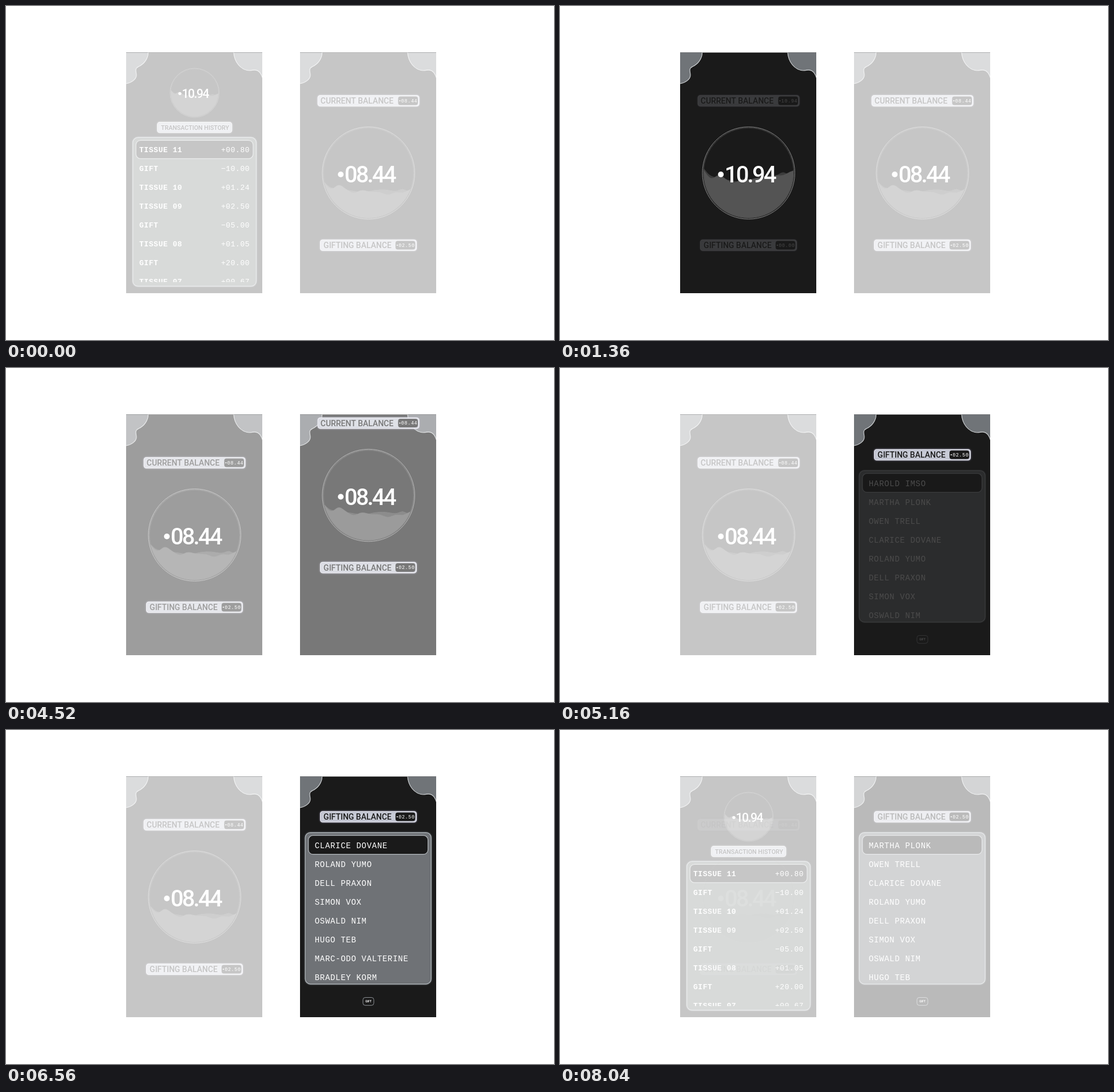
Recreate the animation shown at these times as an HTML page with a canvas. Size 958x585 px, loop 8.12 s.

```html
<!DOCTYPE html>
<html lang="en">
<head>
<meta charset="utf-8">
<title>Balance screens</title>
<style>
html, body { margin: 0; width: 100%; height: 100%; overflow: hidden; background: #fff; }
canvas { display: block; }
</style>
</head>
<body>
<canvas id="stage" width="958" height="585"></canvas>
<script>
const W = 958, H = 585, LOOP = 8120;
const DARK = '#1a1a1a', PILL = '#c8cbd6', DIM = 0.75;
const SANS = 'Roboto, Arial, sans-serif';
const MONO = '"Liberation Mono", "Courier New", monospace';

const stage = document.getElementById('stage').getContext('2d');
const spare = document.createElement('canvas');
spare.width = W;
spare.height = H;
const spareCtx = spare.getContext('2d');
let c = stage;

const history = [
  ['TISSUE 11', '+00.80'], ['GIFT', '−10.00'], ['TISSUE 10', '+01.24'], ['TISSUE 09', '+02.50'],
  ['GIFT', '−05.00'], ['TISSUE 08', '+01.05'], ['GIFT', '+20.00'], ['TISSUE 07', '+00.67']
];
const people = [
  'HAROLD IMSO', 'MARTHA PLONK', 'OWEN TRELL', 'CLARICE DOVANE', 'ROLAND YUMO', 'DELL PRAXON',
  'SIMON VOX', 'OSWALD NIM', 'HUGO TEB', 'MARC-ODO VALTERINE', 'BRADLEY KORM'
];
// water surface relative to the dial centre, for a radius of 81
const front = [[-82, 10], [-74, 22], [-64, 30], [-52, 19], [-40, 28], [-26, 37], [-12, 29], [4, 34],
  [20, 33], [34, 40], [48, 33], [60, 36], [72, 29], [82, 26]];
const back = [[-82, 10], [-72, 24], [-58, 28], [-30, 31], [-8, 35], [10, 30], [30, 29], [48, 33],
  [60, 27], [68, 33], [82, 25]];

const line = (t, a, b) => Math.min(1, Math.max(0, (t - a) / (b - a)));
const ease = (t, a, b) => { const p = line(t, a, b); return p * p * (3 - 2 * p); };
const cubic = p => p < 0.5 ? 4 * p ** 3 : 1 - 4 * (1 - p) ** 3;
const mix = (a, b, p) => a + (b - a) * p;
const money = v => v.toFixed(2).padStart(5, '0');

// draws a group with a common opacity
function layer(alpha, draw) {
  if (alpha <= 0) return;
  if (alpha >= 1) return draw();
  const base = c;
  c = spareCtx;
  c.clearRect(0, 0, W, H);
  c.save();
  c.setTransform(base.getTransform());
  draw();
  c.restore();
  c = base;
  c.save();
  c.resetTransform();
  c.globalAlpha = alpha;
  c.drawImage(spare, 0, 0);
  c.restore();
}

function text(str, x, y, font, color, spacing = 0, align = 'left') {
  c.font = font;
  c.fillStyle = color;
  c.letterSpacing = spacing + 'px';
  c.textAlign = align;
  c.fillText(str, x, y);
}

function box(x, y, w, h, r, fill, stroke, width = 1, glow) {
  c.save();
  c.beginPath();
  c.roundRect(x, y, w, h, r);
  if (glow) {
    c.shadowColor = glow;
    c.shadowBlur = 3;
  }
  if (fill) {
    c.fillStyle = fill;
    c.fill();
  }
  if (stroke) {
    c.strokeStyle = stroke;
    c.lineWidth = width;
    c.stroke();
  }
  c.restore();
}

function dot(x, y, r, color) {
  c.beginPath();
  c.arc(x, y, r, 0, 7);
  c.fillStyle = color;
  c.fill();
}

function pill(label, x, y, w, value) {
  box(x, y - 9.2, w, 18.4, 4, PILL, '#eef0f5', 1.2, '#8f8ba6');
  text(label, x + 4.5 + (label[0] === 'G' ? 1 : 0), y + 5.2, '500 14px ' + SANS, DARK);
  const left = x + w - 36.5;
  box(left, y - 7.5, 34.5, 15, 4, DARK);
  dot(left + 3, y, 1.1, '#fff');
  text(money(value), left + 5.3, y + 2.7, '8.5px ' + MONO, '#fff', 0.6);
}

function surface(points, lift) {
  const p = points.map(([x, y]) => [x, y + lift(x / 81)]);
  c.beginPath();
  c.moveTo(...p[0]);
  for (let i = 1; i < p.length - 1; i++) {
    const [x, y] = p[i], [nx, ny] = p[i + 1];
    c.quadraticCurveTo(x, y, (x + nx) / 2, (y + ny) / 2);
  }
  c.lineTo(...p[p.length - 1]);
}

function water(points, lift, fill, stroke) {
  surface(points, lift);
  c.strokeStyle = stroke;
  c.lineWidth = 0.7;
  c.stroke();
  c.lineTo(90, 90);
  c.lineTo(-90, 90);
  c.fillStyle = fill;
  c.fill();
}

function dial(y, r, value, rise = 0, slosh = 0, phase = 0) {
  c.save();
  c.translate(329.7, y);
  c.scale(r / 81, r / 81);
  c.save();
  c.beginPath();
  c.arc(0, 0, 78.7, 0, 7);
  c.clip();
  water(back, u => rise + slosh * Math.sin(phase + 0.4 - 2.2 * u), '#3c3c3c', '#565656');
  water(front, u => rise + slosh * Math.sin(phase - 2.2 * u), '#545454', '#585858');
  c.restore();
  for (const [radius, color] of [[80.8, '#8a8a8a'], [79, '#484848']]) {
    c.beginPath();
    c.arc(0, 0, radius, 0, 7);
    c.strokeStyle = color;
    c.lineWidth = 1;
    c.stroke();
  }
  dot(-48.5, 2.5, 5, '#fff');
  text(money(value), -42, 16.7, '500 40px ' + SANS, '#fff', -2.8);
  c.restore();
}

function listFrame(x, y, w, h, rowH, fill) {
  box(x, y, w, h, 9, fill, '#a9afb3', 1.4, '#606468');
  box(x + 5.5, y + 5, w - 11, rowH, 8, DARK, '#b3b8bc', 1.2);
}

function historyList() {
  box(264.7, 203.7, 130, 18, 4, PILL, '#e4e6ea', 1.2, '#85858f');
  text('TRANSACTION HISTORY', 271, 216.7, '500 10.7px ' + SANS, DARK);
  listFrame(221.7, 230.3, 215.8, 260.5, 32, '#636b67');
  c.save();
  c.beginPath();
  c.rect(222, 231, 215, 252.5);
  c.clip();
  history.forEach(([name, amount], i) => {
    const y = 255.7 + 33 * i;
    text(name, 233, y, 'bold 13px ' + MONO, '#fff', 0.55);
    text(amount, 376, y, '13px ' + MONO, '#fff', 0.55);
  });
  c.restore();
}

function peopleList(scroll) {
  listFrame(219.2, 179.7, 220, 265.3, 33, '#6f7276');
  c.save();
  c.beginPath();
  c.rect(220, 185, 219, 256);
  c.clip();
  people.forEach((name, i) =>
    text(name, 235.7, 206.5 + 33 * (i - scroll), '14px ' + MONO, '#fff', 0.7));
  c.restore();
  box(320, 468.5, 19, 13.8, 4, null, '#8c9094');
  text('GIFT', 329.5, 477.3, 'bold 5px ' + SANS, '#fff', 0, 'center');
}

function corners() {
  c.fillStyle = '#707478';
  c.strokeStyle = '#d3d6d8';
  c.lineWidth = 1.1;
  const left = 'M248.5 81C249 92 241 102 232 106C224 110 228 115 228 121C228 129 218 135 210 136';
  const right = 'M398 81C399 98 410 112 425 113C432 113 436 110 441 114C445 117 447 121 448.5 126';
  for (const d of [left, right]) {
    c.fill(new Path2D(d + 'V81Z'));
    c.stroke(new Path2D(d));
  }
}

function panel(x, dim, draw) {
  c.save();
  c.translate(x, 0);
  c.beginPath();
  c.rect(210, 81.5, 238, 421.5);
  c.clip();
  c.fillStyle = DARK;
  c.fillRect(210, 81, 238, 423);
  corners();
  draw();
  c.fillStyle = `rgba(255,255,255,${dim})`;
  c.fillRect(210, 81, 238, 423);
  c.restore();
}

function pills(current, gift, up = 0) {
  pill('CURRENT BALANCE', 241.3, 166 - up, 176.7, current);
  pill('GIFTING BALANCE', 245.6, Math.max(152, 419 - up), 167.8, gift);
}

function leftScreen(t) {
  const grow = ease(t, 440, 940);
  const shrink = ease(t, 2640, 3300) - ease(t, 3440, 4200);
  const y = mix(152, 292.5, grow) - 35.5 * shrink;
  const r = mix(43, 81, grow) - 15 * shrink;
  const value = 10.94 - 2.5 * ease(t, 3157, 4100);
  const given = 2.5 * ease(t, 3290, 4240);
  const rise = -24 * (1 - ease(t, 2640, 3600));
  const slosh = 7 * ease(t, 440, 1200) * (1 - 0.75 * line(t, 1400, 3300)) * (1 - ease(t, 3400, 4240));
  const phase = 0.4 + (t - 1360) * Math.PI / 1000;
  const swap = line(t, 7640, 8100);

  if (swap > 0) {
    layer(swap * 1.15, () => {
      dial(152, 43, 10.94, -24);
      historyList();
    });
  }
  layer(1 - swap, () => {
    dial(y, r, value, rise, slosh, phase);
    if (t > 1760) pills(10.94 - given, given);
  });
  if (t <= 1760) {
    layer(line(t, 1270, 1760), () => pills(10.94, 0));
    layer(1 - ease(t, 440, 860), historyList);
  }
}

function rightScreen(t) {
  const up = 330 * cubic(line(t, 4240, 4990));
  if (up < 330) dial(292.5 - up, 81, 8.44);
  pills(8.44, 2.5, up);
  const scroll = 3 * ease(t, 5900, 6600) - 2 * ease(t, 6620, 7640);
  layer(line(t, 5060, 5540), () => peopleList(scroll));
}

function draw(now) {
  const t = now % LOOP;
  c.fillStyle = '#fff';
  c.fillRect(0, 0, W, H);
  panel(0, DIM * (1 - ease(t, 40, 440) + ease(t, 4240, 4650)), () => leftScreen(t));
  panel(304, DIM * (1 - ease(t, 4240, 4840) + line(t, 7640, 8070)), () => rightScreen(t));
  requestAnimationFrame(draw);
}
requestAnimationFrame(draw);
</script>
</body>
</html>
```
